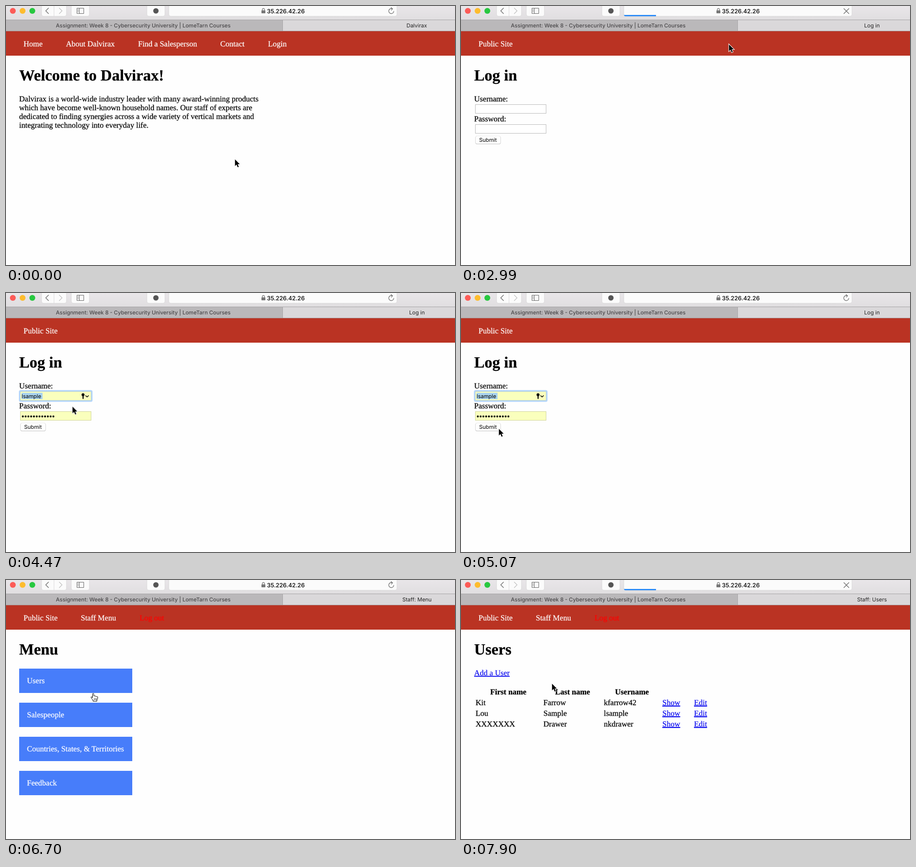
Recreate the animation shown at these times as an HTML page. Size 921 by 532 pixels, loop 8000 ms.

```html
<!DOCTYPE html>
<html lang="en">
<head>
<meta charset="utf-8">
<title>Site login</title>
<style>
  html, body { margin: 0; width: 100%; height: 100%; overflow: hidden; background: #fefefe; }
  svg { display: block; width: 921px; height: 532px; }
  text {
    font: 16px "Liberation Serif", Times, serif;
    white-space: pre;
    text-rendering: geometricPrecision;
    stroke: #000;
    stroke-width: .25px;
  }
  .h1 { font-size: 32px; font-weight: 700; }
  .th { font-weight: 700; }
  .ui { font: 11px Inter, Roboto, sans-serif; stroke: none; }
  .tab { font-weight: 500; fill: #4a484a; text-anchor: middle; }
  .on { font-weight: 400; fill: #222; }
  .url { font-size: 12px; font-weight: 500; }
  .nav, .nav text { fill: #fff; stroke: #fff; }
  .out { fill: #f00; stroke: #f00; }
  .link, .link text { fill: #00e; stroke: #00e; stroke-width: .15px; text-decoration: underline; }
  .btn { fill: #fbfbfb; stroke: #cfcdcf; stroke-width: .6; }
  .icon { fill: none; stroke: #6a6a6a; stroke-width: 1.2; }
  .field { fill: #fff; stroke: #bdbdbd; }
  .filled .field { fill: #faffbd; stroke: #d3d7a0; }
  .ring { stroke: #b3d5fa; stroke-width: 3; }

  /* Every state shares one clock */
  .t { animation: 8s step-end -10ms infinite; }
  .home { animation-name: home; }
  .login { animation-name: login; }
  .menu { animation-name: menu; }
  .users { animation-name: users; }
  .loading { animation-name: loading; }
  .idle { animation-name: idle; }
  .focus { animation-name: focus; }
  .filled { animation-name: filled; }
  .arrow { animation-name: arrow; }
  .hand { animation-name: hand; }
  .beam { animation-name: beam; }
  .pointer { animation-name: move; }

  @keyframes home { 0% { visibility: visible } 33.75%, 100% { visibility: hidden } }
  @keyframes login { 0%, 76.25%, 100% { visibility: hidden } 33.75% { visibility: visible } }
  @keyframes menu { 0%, 91.25%, 100% { visibility: hidden } 76.25% { visibility: visible } }
  @keyframes users { 0% { visibility: hidden } 91.25%, 100% { visibility: visible } }
  @keyframes loading {
    0%, 41.125%, 80% { visibility: hidden }
    31.875%, 69%, 89.375%, 100% { visibility: visible }
  }
  @keyframes idle {
    0%, 41.125%, 80% { visibility: visible }
    31.875%, 69%, 89.375%, 100% { visibility: hidden }
  }
  @keyframes focus { 0%, 55.875%, 100% { visibility: hidden } 48.625% { visibility: visible } }
  @keyframes filled { 0%, 76.25%, 100% { visibility: hidden } 55.875% { visibility: visible } }
  @keyframes arrow {
    0%, 33.75%, 54%, 91.25%, 100% { visibility: visible }
    24.375%, 48.625%, 81.875% { visibility: hidden }
  }
  @keyframes hand {
    0%, 33.75%, 91.25%, 100% { visibility: hidden }
    24.375%, 81.875% { visibility: visible }
  }
  @keyframes beam { 0%, 54%, 100% { visibility: hidden } 48.625% { visibility: visible } }
  @keyframes move {
    0% { transform: translate(470px, 315px); animation-timing-function: steps(2) }
    3.75% { transform: translate(466px, 309px) }
    9.375% { transform: translate(466px, 309px); animation-timing-function: steps(6) }
    20.625% { transform: translate(538px, 88px) }
    22.5% { transform: translate(547px, 83px) }
    24.375% { transform: translate(550px, 79px) }
    37.375% { transform: translate(550px, 79px); animation-timing-function: steps(4) }
    44.875% { transform: translate(205px, 222px); animation-timing-function: steps(3) }
    50.375% { transform: translate(159px, 209px) }
    54% { transform: translate(159px, 209px); animation-timing-function: steps(3) }
    59.625% { transform: translate(92px, 282px); animation-timing-function: steps(2) }
    63.375% { transform: translate(78px, 279px) }
    70.75% { transform: translate(78px, 279px); animation-timing-function: steps(2) }
    74.375% { transform: translate(120px, 318px) }
    76.25% { transform: translate(120px, 318px); animation-timing-function: steps(4) }
    83.75% { transform: translate(179px, 233px); animation-timing-function: steps(2) }
    87.5% { transform: translate(184px, 216px) }
    94.9% { transform: translate(184px, 216px); animation-timing-function: steps(2) }
    98.75%, 100% { transform: translate(187px, 213px) }
  }
</style>
</head>
<body>
<svg viewBox="0 0 921 532">
  <defs>
    <linearGradient id="bar" x2="0" y2="1">
      <stop stop-color="#e9e6e9"/><stop offset="1" stop-color="#e0dee0"/>
    </linearGradient>
    <g id="key">
      <circle cx="158" cy="209" r="3"/>
      <path d="M157 211h2.2v6l-1.1 1-1.1-1z"/>
      <path d="M163 210.5l3.3 3 3.3-3" fill="none" stroke="currentColor" stroke-width="1.5"/>
    </g>
    <path id="ibeam" d="M-3-7.5q3 0 3 2.5V4q0 2.5-3 2.5M3-7.5q-3 0-3 2.5V4q0 2.5 3 2.5M-1.5 1h3" fill="none"/>
  </defs>
  <rect width="921" height="532" fill="#fefefe"/>

  <!-- Browser frame -->
  <rect width="921" height="28" fill="url(#bar)"/>
  <rect y="28" width="567" height="24" fill="#bab8ba"/>
  <rect x="568" y="28" width="353" height="24" fill="#dad8da"/>
  <path d="M0 28.5H921M567.5 28V52" stroke="#a9a7a9"/>
  <circle cx="14" cy="10" r="6" fill="#fc5b57"/>
  <circle cx="34" cy="10" r="6" fill="#fdbc2e"/>
  <circle cx="54" cy="10" r="6" fill="#28c840"/>
  <rect class="btn" x="73" y="-4" width="51" height="25" rx="4"/>
  <rect class="btn" x="134" y="-4" width="37" height="25" rx="4"/>
  <rect class="btn" x="289" y="-4" width="37" height="25" rx="4"/>
  <rect class="btn" x="334" y="-4" width="468" height="25" rx="4"/>
  <path d="M98.5 0V21" stroke="#dddbdd"/>
  <path class="icon" d="M87.5 4l-6 6 6 6"/>
  <path class="icon" d="M109 4l6 6-6 6" style="stroke:#c0c0c0"/>
  <path class="icon" d="M145.5 4.5h14v11h-14zM150.5 4.5v11M147 7h2M147 9.5h2M147 12h2" style="stroke-width:1"/>
  <circle cx="307.5" cy="10" r="5.5" fill="#555"/>
  <rect x="524" y="9" width="8" height="6" rx=".8" fill="#777"/>
  <path class="icon" d="M525.7 9V7.5a2.3 2.3 0 0 1 4.6 0V9" style="stroke:#777"/>
  <text class="ui url" x="574" y="14.5" text-anchor="middle">35.226.42.26</text>
  <g class="t idle">
    <path class="icon" d="M795.5 10.5a5.2 5.2 0 1 1-3-4.8M789.5 3l3.5 2.8-3 3"/>
  </g>
  <g class="t loading">
    <path class="icon" d="M785 5l11 11M796 5l-11 11"/>
    <path d="M334 18.5H400V21H337Q335 21 334 18.5z" fill="#1a82f7"/>
  </g>
  <text class="ui tab" x="281.5" y="44">Assignment: Week 8 - Cybersecurity University | LomeTarn Courses</text>
  <rect y="52" width="921" height="50" fill="#ba3323"/>
  <path d="M0 51.5H921" stroke="#a58b8a"/>

  <g class="t home">
    <text class="ui tab on" x="842.5" y="44">Dalvirax</text>
    <g class="nav">
      <text x="36" y="83">Home</text>
      <text x="123" y="83">About Dalvirax</text>
      <text x="271" y="83">Find a Salesperson</text>
      <text x="439.5" y="83">Contact</text>
      <text x="537.5" y="83">Login</text>
    </g>
    <text class="h1" x="27" y="153">Welcome to Dalvirax!</text>
    <text x="27" y="196">Dalvirax is a world-wide industry leader with many award-winning products</text>
    <text x="27" y="214">which have become well-known household names. Our staff of experts are</text>
    <text x="27" y="232">dedicated to finding synergies across a wide variety of vertical markets and</text>
    <text x="27" y="250">integrating technology into everyday life.</text>
  </g>

  <g class="t login">
    <text class="ui tab on" x="843" y="44">Log in</text>
    <text class="nav" x="36" y="83">Public Site</text>
    <text class="h1" x="27" y="153">Log in</text>
    <text x="27" y="196">Username:</text>
    <rect class="field" x="29.5" y="202.5" width="145" height="18"/>
    <text x="27" y="237">Password:</text>
    <rect class="field" x="29.5" y="243.5" width="145" height="18"/>
    <rect x="29.5" y="267" width="52" height="17" rx="3.5" fill="#c4c4c4"/>
    <rect x="30" y="267" width="51" height="16" rx="3" fill="#fff" stroke="#dedede" stroke-width=".6"/>
    <text class="ui" x="55.3" y="279" text-anchor="middle">Submit</text>
  </g>
  <g class="t focus">
    <rect class="ring" x="28" y="201" width="148" height="21" rx="2" fill="#fff"/>
    <path d="M32.5 205V218" stroke="#000"/>
    <use href="#key" fill="#0a7aff" color="#0a7aff"/>
  </g>
  <g class="t filled">
    <rect class="field" x="29.5" y="202.5" width="145" height="18"/>
    <rect class="ring" x="28" y="201" width="148" height="21" rx="2" fill="none"/>
    <rect x="32" y="205" width="43" height="13" fill="#a9d3ee"/>
    <text class="ui" x="32" y="216">lsample</text>
    <use href="#key" color="#000"/>
    <rect class="field" x="29.5" y="243.5" width="145" height="18"/>
    <path d="M34.5 253.5H97.5" stroke="#000" stroke-width="4" stroke-linecap="round" stroke-dasharray="0 5.7"/>
  </g>

  <g class="t menu">
    <text class="ui tab on" x="843" y="44">Staff: Menu</text>
    <text class="nav" x="36" y="83">Public Site</text>
    <text class="nav" x="153.5" y="83">Staff Menu</text>
    <text class="out" x="274" y="83">Log out</text>
    <text class="h1" x="27" y="153">Menu</text>
    <path d="M27 182h232v50H27zm0 70h232v50H27zm0 70h232v50H27zm0 70h232v50H27z" fill="#477dfa"/>
    <g class="nav">
      <text x="43" y="212">Users</text>
      <text x="43" y="282">Salespeople</text>
      <text x="43" y="352">Countries, States, &amp; Territories</text>
      <text x="43" y="422">Feedback</text>
    </g>
  </g>

  <g class="t users">
    <text class="ui tab on" x="843" y="44">Staff: Users</text>
    <text class="nav" x="36" y="83">Public Site</text>
    <text class="nav" x="153.5" y="83">Staff Menu</text>
    <text class="out" x="274" y="83">Log out</text>
    <text class="h1" x="27" y="153">Users</text>
    <text class="link" x="27" y="196">Add a User</text>
    <text class="th" x="60" y="235">First name</text>
    <text class="th" x="193" y="235">Last name</text>
    <text class="th" x="316" y="235">Username</text>
    <text x="30" y="257">Kit</text><text x="169" y="257">Farrow</text><text x="293" y="257">kfarrow42</text>
    <text x="30" y="279">Lou</text><text x="169" y="279">Sample</text><text x="293" y="279">lsample</text>
    <text x="30" y="301">XXXXXXX</text><text x="169" y="301">Drawer</text><text x="293" y="301">nkdrawer</text>
    <g class="link">
      <text x="413" y="257">Show</text><text x="478" y="257">Edit</text>
      <text x="413" y="279">Show</text><text x="478" y="279">Edit</text>
      <text x="413" y="301">Show</text><text x="478" y="301">Edit</text>
    </g>
  </g>

  <g class="t pointer">
    <path class="t arrow" d="M-.3 0V13.800l3.200-3 2.400 5.400 2.200-1-2.300-5.200H9.500z" stroke="#fff" stroke-width="2" paint-order="stroke"/>
    <g class="t beam">
      <use href="#ibeam" stroke="#fff" stroke-width="2.4"/>
      <use href="#ibeam" stroke="#000" stroke-width="1.2"/>
    </g>
    <g class="t hand" stroke="#000" stroke-linejoin="round">
      <path d="M-1.5 9V1.5q0-1.5 1.3-1.5t1.3 1.5V5q2.3-1 2.7.8 2.2-.9 2.7.8 2.5-.7 2.7 1.4 0 3.500-1.700 5.500v2.500H-.5v-2Q-3 11-4.500 8.500q-.5-1.700 1-1.700z" fill="#fff"/>
      <path d="M2 10v3.500M4.200 10v3.500M6.400 10v3.500" stroke-width=".8"/>
    </g>
  </g>
</svg>
</body>
</html>
```
